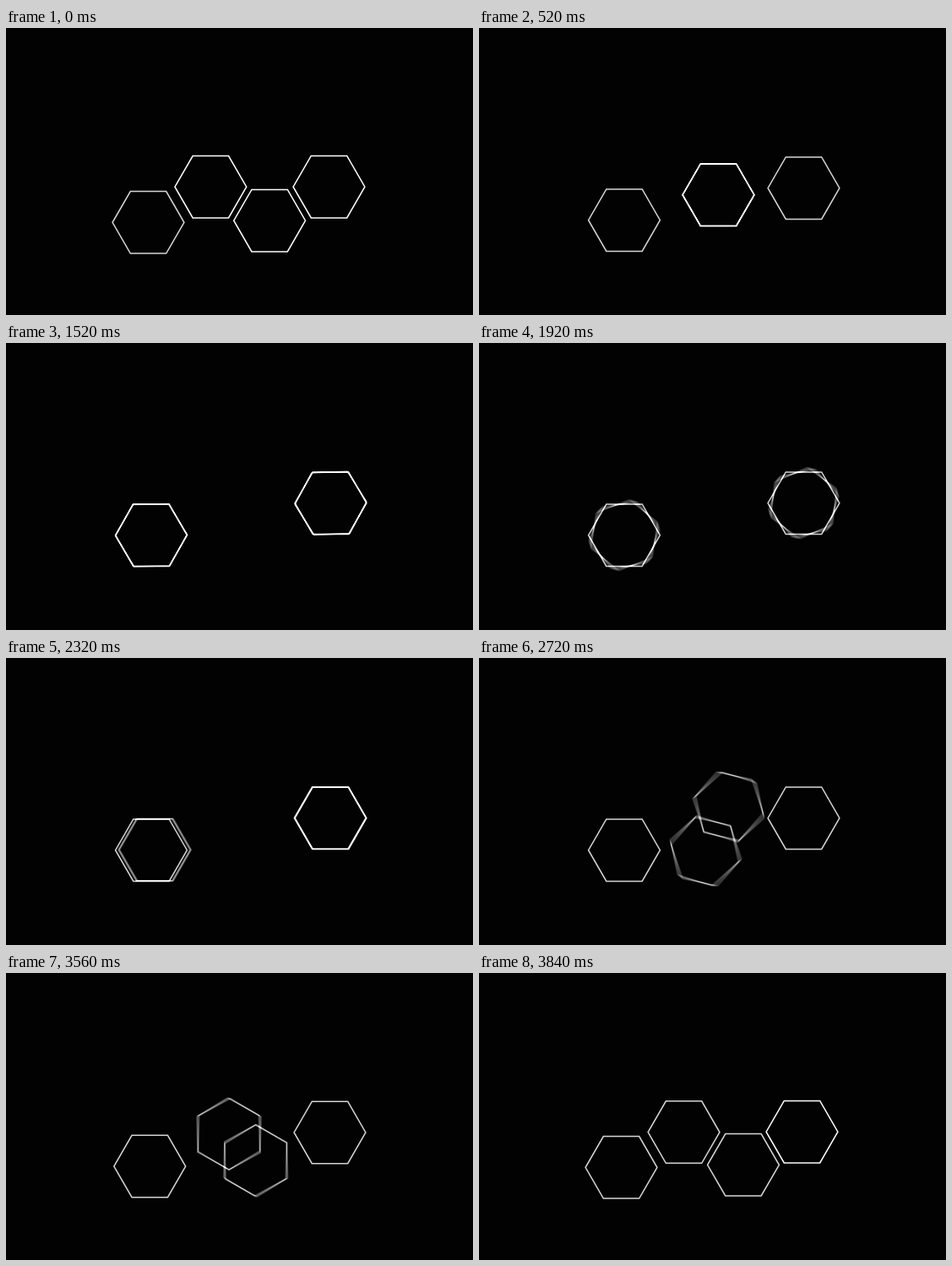
Write an HTML page with a canvas that moves like this. It is 553 px wide and 340 px high and loops after 4320 ms.

```html
<!DOCTYPE html>
<html lang="en">
<head>
<meta charset="utf-8">
<title>Hexagons</title>
<style>
  html, body { margin: 0; width: 100%; height: 100%; overflow: hidden; background: #020202; }
  canvas { display: block; }
</style>
</head>
<body>
<canvas id="stage" width="553" height="340"></canvas>
<script>
const LOOP = 4320, STEP = 40, RADIUS = 42.4;
const SHUTTER = 20, SAMPLES = 7;
const LEFT = [172, 227.7], RIGHT = [384.5, 189.7];
const ctx = document.getElementById('stage').getContext('2d');

const rad = deg => deg * Math.PI / 180;
const lerp = (a, b, p) => a + (b - a) * p;
const mix = (a, b, p) => [lerp(a[0], b[0], p), lerp(a[1], b[1], p)];
const span = (t, from, to) => Math.min(1, Math.max(0, (t - from) / (to - from)));
const sine = (t, from, to) => (1 - Math.cos(Math.PI * span(t, from, to))) / 2;
const cubic = (t, from, to) => {
  const p = span(t, from, to);
  return p < 0.5 ? 4 * p ** 3 : 1 - 4 * (1 - p) ** 3;
};
const polar = ([x, y], r, deg) => [x + r * Math.cos(rad(deg)), y + r * Math.sin(rad(deg))];

// The outer pair drifts slightly as the inner pair gathers and parts.
function outer(rest, inner) {
  return t => {
    const p = sine(t, 0, 520) - sine(t, 3280, 3840);
    return { at: mix(rest, inner, p), turn: 0 };
  };
}

// side: 0 = hexagon that visits the left, 1 = the right
function inner(side) {
  const flip = side * 180;
  const spot = side ? RIGHT : LEFT;
  const far = side ? { r: 103.3, angle: 172.8 } : { r: 112.8, angle: 167.2 };
  const depart = side ? 2260 : 2200;

  return t => {
    if (t < 1010) {
      const p = sine(t, 0, 520);
      const hub = mix([277.25, 208.2], [283.5, 197.7], p);
      return { at: polar(hub, 40.2 * (1 - p), lerp(-150.2, -90, p) + flip), turn: 60 * p };
    }
    if (t < depart) {
      return {
        at: mix([283.5, 197.7], spot, sine(t, 1010, 1510)),
        turn: -360 * sine(t, side ? 1490 : 1500, 2160)
      };
    }
    const approach = cubic(t, depart, 2720);
    const orbit = -300 * sine(t, 2480, 3425);
    const collapse = cubic(t, 2960, 3240);
    const part = sine(t, 3280, 3840);
    const hub = mix(mix([282, 202.5], [282, 205], collapse), [277.75, 207.9], part);
    const r = lerp(lerp(far.r, 30, approach) * lerp(1, 0.15, collapse), 40.2, part);
    const angle = lerp(far.angle, 160, approach) + 0.93 * orbit - 32.2 * part + flip;
    return { at: polar(hub, r, angle), turn: orbit - 60 * part };
  };
}

const resting = t => t < STEP;
const hexagons = [
  { pose: outer([168.5, 230.3], LEFT), level: () => 0.82 },
  { pose: inner(0), level: t => resting(t) ? 1 : 0.82 },
  { pose: inner(1), level: t => resting(t) ? 1 : 0.82 },
  { pose: outer([382.5, 188.2], RIGHT), level: t => resting(t) || t >= 3840 ? 1 : 0.82 }
];

function hexagon({ at, turn }) {
  ctx.beginPath();
  for (let i = 0; i < 6; i++) ctx.lineTo(...polar(at, RADIUS, turn + i * 60));
  ctx.closePath();
  ctx.stroke();
}

function draw(t) {
  ctx.globalCompositeOperation = 'source-over';
  ctx.globalAlpha = 1;
  ctx.fillStyle = '#020202';
  ctx.fillRect(0, 0, 553, 340);

  // Additive sub-samples give the motion blur.
  ctx.globalCompositeOperation = 'lighter';
  ctx.strokeStyle = '#fff';
  ctx.lineWidth = 1.5;
  for (const { pose, level } of hexagons) {
    ctx.globalAlpha = level(t) / SAMPLES;
    for (let i = 0; i < SAMPLES; i++) {
      const offset = (i / (SAMPLES - 1) - 0.5) * SHUTTER;
      hexagon(pose(resting(t) ? 0 : t + offset));
    }
  }
}

const start = performance.now();
function tick() {
  const t = (performance.now() - start) % LOOP;
  draw(Math.floor(t / STEP) * STEP);
  requestAnimationFrame(tick);
}
tick();
</script>
</body>
</html>
```
